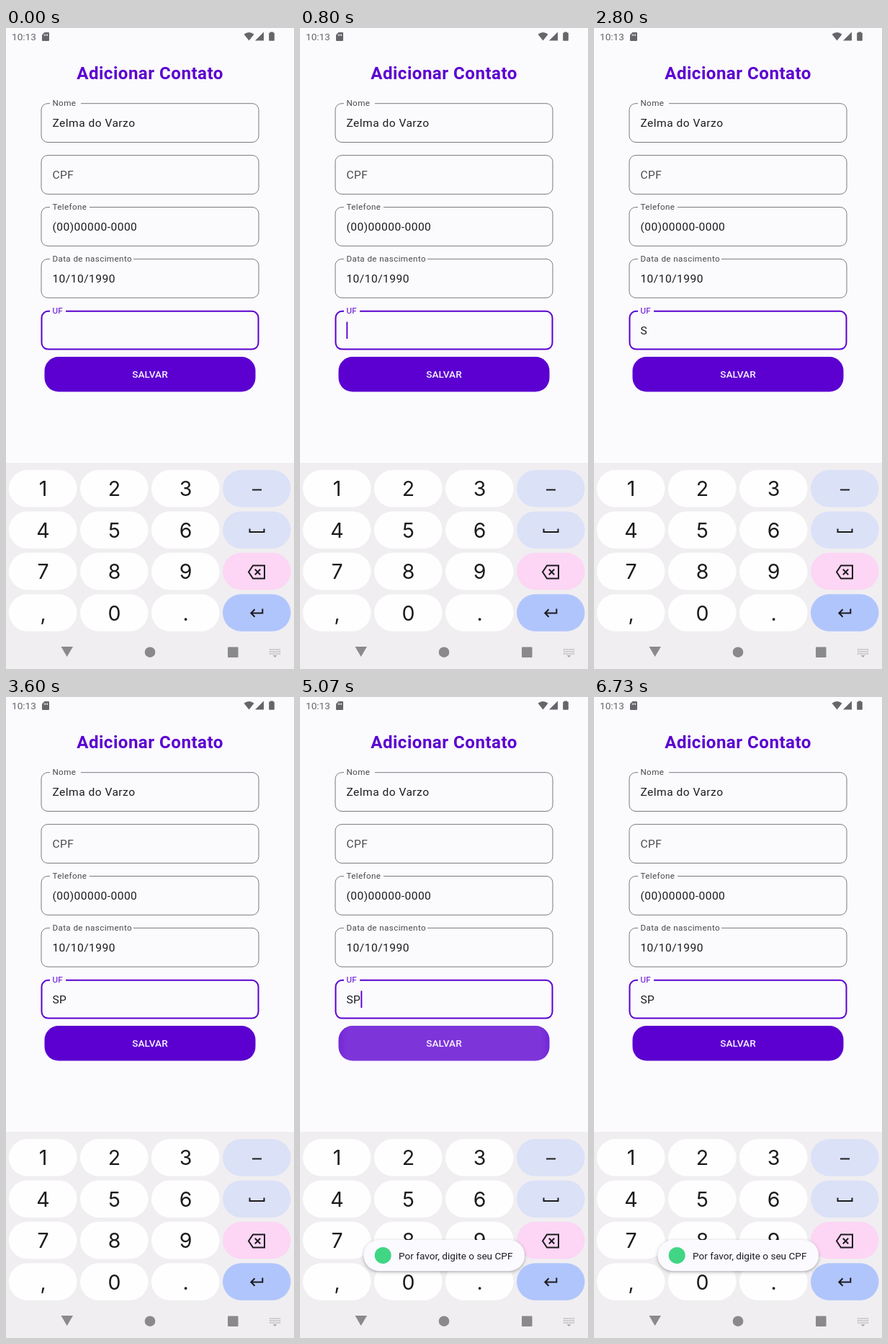
These frames come from a looping animation (400x889 px, 6.79 s). An HTML page:

```html
<!DOCTYPE html>
<html lang="pt-BR">
<head>
<meta charset="utf-8">
<title>Adicionar Contato</title>
<style>
  :root { --page: #fbfafd; --purple: #5b00d0; --ink: #1c1b1e; --muted: #4b494e; }
  html, body { margin: 0; height: 100%; overflow: hidden; background: var(--page); }
  svg { display: block; width: 100vw; height: 100vh; }
  text { font-family: Roboto, sans-serif; fill: var(--ink); }
  .page { fill: var(--page); }
  .purple { fill: var(--purple); }
  .status, .status text { fill: #66656a; }
  .title { font-size: 24.1px; font-weight: 700; letter-spacing: .486px; fill: var(--purple); }
  .value { font-size: 15.55px; letter-spacing: .486px; }
  .hint { fill: var(--muted); }
  .label { font-size: 11.67px; letter-spacing: .39px; fill: var(--muted); }
  .field { fill: none; stroke: #7b7980; stroke-width: 1; }
  .focused .field { stroke: var(--purple); stroke-width: 2; }
  .focused .label { fill: var(--purple); }
  .small { font-size: 13.6px; }
  .salvar { font-weight: 500; letter-spacing: .1px; fill: #f8f2ff; }
  .digit { font: 28.5px Inter, sans-serif; }
  .icon { fill: none; stroke: var(--ink); stroke-width: 2; }
  .mid { text-anchor: middle; }
</style>
</head>
<body>
<svg viewBox="0 0 400 889" preserveAspectRatio="none">
  <defs>
    <clipPath id="buttonClip"><rect x="53.5" y="456" width="293" height="48.6" rx="19.5"/></clipPath>
    <radialGradient id="rippleFill">
      <stop offset=".75" stop-color="#fff"/>
      <stop offset="1" stop-color="#fff" stop-opacity="0"/>
    </radialGradient>
    <filter id="shadow" x="-10%" y="-30%" width="120%" height="170%">
      <feDropShadow dx="0" dy="1.5" stdDeviation="2" flood-color="#444" flood-opacity=".45"/>
    </filter>
  </defs>
  <rect class="page" width="400" height="889"/>

  <g class="status">
    <text class="small" x="8" y="17">10:13</text>
    <path d="M53.5 6H59a1 1 0 0 1 1 1V17a1 1 0 0 1-1 1H51a1 1 0 0 1-1-1V9.5Z"/>
    <path d="M53.3 8.5v2.5M55.4 8.5v2.5M57.5 8.5v2.5" stroke="#fbfafd"/>
    <path d="M330.5 8.8Q337.5 3.2 344.5 8.8L337.5 17.5Z"/>
    <path d="M346 17.5H358V5.5Z"/>
    <path d="M367 6.6V5.4H371V6.6H372a.8.8 0 0 1 .8.8V17a.8.8 0 0 1-.8.8H366a.8.8 0 0 1-.8-.8V7.4a.8.8 0 0 1 .8-.8Z"/>
  </g>

  <text class="title mid" x="200" y="71">Adicionar Contato</text>
  <g id="fields"></g>
  <text class="value" id="uf" x="64.4" y="424.6"></text>
  <rect class="purple" id="caret" y="407.5" width="1.9" height="23.5"/>

  <g clip-path="url(#buttonClip)">
    <rect class="purple" x="53" y="455" width="294" height="51"/>
    <circle id="ripple" cy="488" fill="url(#rippleFill)"/>
  </g>
  <text class="small salvar mid" x="200" y="485.4">SALVAR</text>

  <rect y="603" width="400" height="286" fill="#f0eef1"/>
  <g id="keys"></g>
  <g class="icon">
    <path d="M342 640.5H355"/>
    <path d="M338.5 694.5V699H358.5V694.5"/>
    <path d="M343 745.5H359V763.5H343L337 754.5ZM345.8 750.8L353.2 758.2M353.2 750.8L345.8 758.2"/>
    <path d="M356.3 805.5V811.5H340.5M345.5 806.3L340.3 811.5L345.5 816.7"/>
  </g>
  <g fill="#8a898b">
    <path d="M76.5 858H93L84.7 872Z"/>
    <circle cx="200" cy="865.7" r="7.3"/>
    <rect x="308" y="858.5" width="14.5" height="14.5" rx="1"/>
    <path d="M366 862H381M366 865H381M366 868H381" fill="none" stroke="#aaa9ac" stroke-width="1.6" stroke-dasharray="1.6 1.1"/>
    <path d="M370.5 870H376.5L373.5 873Z" fill="#aaa9ac"/>
  </g>

  <g id="toast">
    <rect x="88.5" y="753" width="223.5" height="43" rx="21.5" fill="#fbfaff" filter="url(#shadow)"/>
    <g id="message">
      <circle cx="115.2" cy="774.4" r="11.5" fill="#40d684"/>
      <text class="small" x="137" y="779.6">Por favor, digite o seu CPF</text>
    </g>
  </g>
  <circle id="touch" r="10.5" fill="#f0ecf2" stroke="#8f8b94"/>
</svg>
<script>
const LOOP = 6790, TAP = 430, TYPE_S = 2130, TYPE_P = 2870, RIPPLE = 4570, TOAST = 4730;
const $ = id => document.getElementById(id);
const set = (el, attrs) => { for (const k in attrs) el.setAttribute(k, attrs[k]); };
const ramp = (t, from, duration) => Math.min(1, Math.max(0, (t - from) / duration));
const mix = (a, b, p) => a + (b - a) * p;
const easeOut = p => 1 - (1 - p) ** 3;

// label, value, gap width
const fields = [
  ["Nome", "Zelma do Varzo", 43],
  ["", "CPF", 0],
  ["Telefone", "(00)00000-0000", 55],
  ["Data de nascimento", "10/10/1990", 116],
  ["UF", "", 22]
];
$("fields").innerHTML = fields.map(([label, value, gap], i) => {
  const y = 104.7 + i * 71.9, focused = label === "UF", inset = focused ? .5 : 0;
  return `<g class="${focused ? "focused" : ""}">
    <rect class="field" x="${49 + inset}" y="${y + inset}" width="${302 - 2 * inset}" height="${53.8 - 2 * inset}" rx="9"/>
    <rect class="page" x="61" y="${y - 2}" width="${gap}" height="4"/>
    <text class="label" x="64.4" y="${y + 3.5}">${label}</text>
    <text class="value ${label ? "" : "hint"}" x="64.4" y="${y + 32.3}">${value}</text>
  </g>`;
}).join("");

const sideColors = ["#dbe1f7", "#dbe1f7", "#fcd6f4", "#b0c5fc"];
$("keys").innerHTML = ["123", "456", "789", ",0."].map((row, r) =>
  [...row, ""].map((char, c) => {
    const x = 4 + c * 99, y = 613 + r * 57.4;
    return `<rect x="${x}" y="${y}" width="94.5" height="51.5" rx="25.7" fill="${char ? "#fefefe" : sideColors[r]}"/>
      <text class="digit mid" x="${x + 47.5}" y="${y + 36.3}">${char}</text>`;
  }).join("")).join("");

const touches = [
  { x: 102, y: 400, down: 330, up: 400 },
  { x: 197, y: 488, down: 4400, up: 4560 }
];

function drawTouch(t) {
  const { x, y, down, up } = touches.findLast(touch => t >= touch.down) || touches[0];
  set($("touch"), { cx: x, cy: y, opacity: t < down ? 0 : .8 * (1 - ramp(t, up, 200)) });
}

function drawToast(t) {
  const scale = mix(.9, 1, easeOut(ramp(t, TOAST, 333)));
  set($("toast"), {
    opacity: ramp(t, TOAST, 66),
    transform: `translate(200 774.5) scale(${scale}) translate(-200 -774.5)`
  });
  set($("message"), { opacity: ramp(t, TOAST + 50, 283) });
}

function draw(t) {
  const typed = t < TYPE_S ? "" : t < TYPE_P ? "S" : "SP";
  $("uf").textContent = typed;

  // Each tap or keystroke restarts the caret's one-second blink.
  const since = t - [TAP, TYPE_S, TYPE_P][typed.length];
  set($("caret"), {
    x: 64.4 + typed.length * 10,
    opacity: since >= 0 && since % 1000 < 500 ? 1 : 0
  });

  drawTouch(t);
  const grow = easeOut(ramp(t, RIPPLE, 450));
  set($("ripple"), {
    cx: mix(197, 200, grow),
    r: mix(30, 180, grow),
    opacity: .24 * ramp(t, RIPPLE, 75) * (1 - ramp(t, RIPPLE + 450, 375))
  });
  drawToast(t);
}

function tick() {
  draw(performance.now() % LOOP);
  requestAnimationFrame(tick);
}
tick();
</script>
</body>
</html>
```
